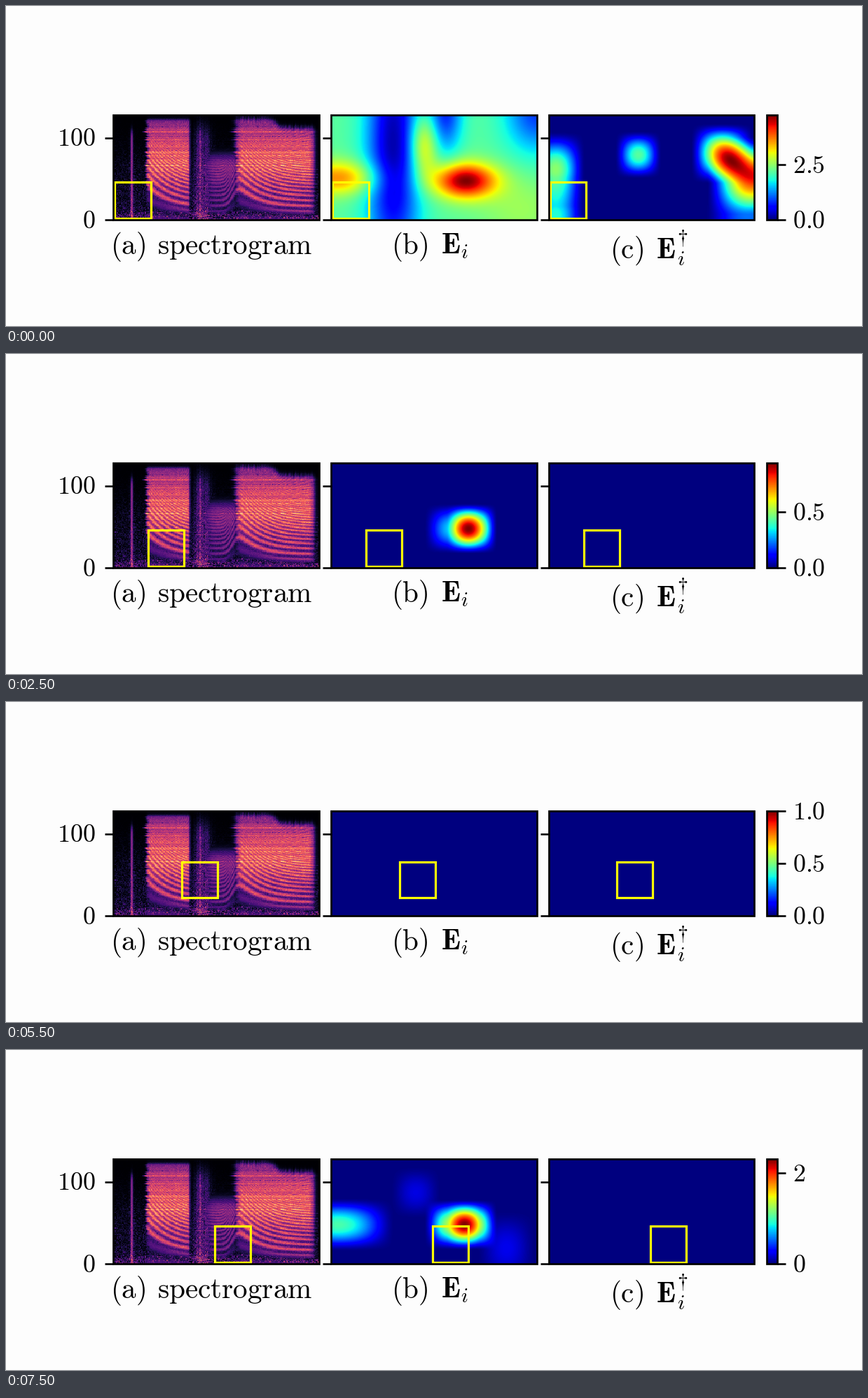
Animation, 1222 px wide and 458 px high, one loop 8000 ms. Source, as a matplotlib script:

```python
import numpy as np
import matplotlib.pyplot as plt
from matplotlib.animation import FuncAnimation
from matplotlib.patches import Rectangle

DPI = 64
W, H = 1222, 458
PT = 72 / DPI                       # points per pixel
TOP, BOTTOM = 156, 306
PANEL_X = (153, 464, 774.5)
PANEL_W = 293.5
BAR_X, BAR_W = 1086, 15
ROWS, COLS = 128, 250
STEPS, ROWS_PER_COLUMN = 16, 5
BOX = 51.2
LABEL, CAPTION, SCRIPT = 36, 41.2, 30

plt.rcParams["mathtext.fontset"] = "cm"


def pixel_grid(x0):
    x = x0 + (np.arange(COLS) + 0.5) * PANEL_W / COLS
    y = TOP + (np.arange(ROWS) + 0.5) * (BOTTOM - TOP) / ROWS
    return np.meshgrid(x, y)


GRID_A, GRID_B, GRID_C = map(pixel_grid, PANEL_X)


def rise(v, edge, width):
    return 1 / (1 + np.exp(np.clip((edge - v) / width, -50, 50)))


def fall(v, edge, width):
    return 1 - rise(v, edge, width)


def spectrogram():
    rng = np.random.default_rng(4)
    x, y = GRID_A
    h = (BOTTOM - y) / (BOTTOM - TOP) * ROWS
    grain = rng.normal(0, 1, x.shape)
    row_grain = rng.normal(0, 1, (ROWS, 1))
    column_grain = rng.normal(0, 1, (1, COLS))

    # two falling calls joined by a low, rising murmur
    lowest = 170 + 700 * np.exp(-np.clip(x - 200, 0, None) / 24)
    lowest += 600 * rise(x, 324, 4) * np.exp(-np.clip(x - 332, 0, None) / 24)
    pitch = 50 + lowest / 2
    freq = 700 * (10 ** (h * 22.2 / 2595) - 1)
    harmonic = np.cos(np.pi * freq / pitch) ** 2

    ragged = x + 1.5 * row_grain
    first = rise(ragged, 201, 1) * fall(x, 262, 0.7) * fall(h, 122, 1.5)
    second = rise(ragged, 328, 2) * fall(x, 439, 2)
    second = second * fall(h, 123 - 11 * rise(x, 386, 4) + column_grain, 2)
    murmur = 0.6 * rise(x, 284, 5) * fall(x, 328, 1) * fall(h, 78, 4)
    voiced = np.maximum(np.maximum(first, second), murmur)

    body = 0.4 + 0.27 * np.exp(-((h - 74) / 31) ** 2)
    tone = body + (0.1 + 0.28 * fall(h, 65, 10)) * (harmonic - 0.5)
    tone = tone + 0.04 * row_grain * rise(h, 50, 6) + 0.04 * grain
    tone = tone * (0.42 + 0.58 * rise(freq / lowest, 0.8, 0.06))

    noise = np.clip(0.07 + 0.07 * grain, 0, 1) * fall(h, 70, 18)
    noise = noise + np.clip(0.14 + 0.08 * grain, 0, 1) * fall(h, 8, 3)
    click = 0.4 * np.exp(-((x - 179.5) / 2) ** 2) * fall(h, 108, 3)
    breath = (0.2 + 0.05 * column_grain) * rise(x, 270, 2) * fall(x, 290, 3)
    breath = breath * fall(h, 112, 6) * (1 + 0.2 * grain)
    return np.clip(np.maximum(voiced * tone, noise + click + breath), 0, 1)


def bump(grid, cx, cy, rx, ry):
    """Separable cosine hill that reaches zero at its radii."""
    u = np.clip(np.abs(grid[0] - cx) / rx, 0, 1)
    v = np.clip(np.abs(grid[1] - cy) / ry, 0, 1)
    return np.clip(np.cos(np.pi * u / 2) * np.cos(np.pi * v / 2), 0, 1) ** 1.5


def blob(grid, cx, cy, sx, sy):
    return np.exp(-((grid[0] - cx) / sx) ** 2 - ((grid[1] - cy) / sy) ** 2)


def unit(field):
    return field / field.max()


def landscape():
    """Plain with a valley, two dips along the top, a ridge and two hot spots."""
    field = 0.46 - 0.42 * blob(GRID_B, 553, 200, 38, 190)
    field -= 0.30 * blob(GRID_B, 627, 150, 24, 60)
    field -= 0.28 * blob(GRID_B, 757, 150, 45, 60)
    field += 0.27 * blob(GRID_B, 596, 200, 20, 45)
    field += 0.08 * blob(GRID_B, 735, 290, 60, 50)
    field += 0.30 * blob(GRID_B, 475, 246, 55, 24)
    field += 0.54 * blob(GRID_B, 655, 250, 44, 25)
    return unit(np.clip(field, 0, None))


LANDSCAPE = landscape()


def field_b(limit):
    """The lower the energy, the fewer hills remain around the main one."""
    side = np.clip((limit - 0.43) / 1.3, 0, 0.85)
    left = np.clip(0.34 * (limit - 1), 0, 0.44)
    mix = np.clip((limit - 2.31) / 2.44, 0, 1)
    hills = unit(bump(GRID_B, 665, 250, 36, 36)
                 + side * bump(GRID_B, 637, 250, 40, 36))
    hills += left * bump(GRID_B, 474, 250, 80, 38)
    hills += 0.2 * left * bump(GRID_B, 585, 204, 36, 38)
    hills += 0.22 * left * bump(GRID_B, 714, 284, 42, 55)
    return unit(mix * LANDSCAPE + (1 - mix) * unit(hills))


def field_c(limit):
    spread = np.sqrt(max(limit - 0.426, 0))
    field = bump(GRID_C, 1065, 243, 46 + 4 * limit, 44 + 2.5 * limit)
    field += 0.17 * limit * bump(GRID_C, 1022, 211, 45, 43)
    field = unit(field)
    field += 0.25 * spread * bump(GRID_C, 784, 234, 42, 54)
    field += 0.19 * spread * bump(GRID_C, 784, 300, 42, 56)
    field += 0.22 * spread * bump(GRID_C, 902, 213, 33, 34)
    field += 0.05 * limit * bump(GRID_C, 1058, 300, 60, 45)
    return unit(field)


COLUMN_START = (4.75, 0.94, 0.94, 2.31)


def energy(column, row):
    """Colour limit for a box position; zero where nothing responds."""
    if column == 0 or row == 0:
        return COLUMN_START[column] * 0.787 ** row
    if column == 2 and row > 1:
        return 1.04 * 0.64 ** (row - 2)
    return 0


def tick_texts(limit):
    """At most two intervals, with as many decimals as the step needs."""
    size, digits = next((s, d) for s, d in
                        [(.25, 2), (.5, 1), (1, 0), (2, 0), (2.5, 1)]
                        if limit / s <= 2)
    return [(k * size, f"{k * size:.{digits}f}")
            for k in range(int(limit / size + 1e-9) + 1)]


fig = plt.figure(figsize=(W / DPI, H / DPI), dpi=DPI, facecolor="#fdfdfd")
ax = fig.add_axes([0, 0, 1, 1])
ax.axis("off")


def put_text(x, y, text, size, ha="left"):
    return ax.text(x, y, f"${text}$", fontsize=size * PT, color="black",
                   ha=ha, va="baseline")


def put_image(data, x, width, cmap, smooth="bilinear"):
    return ax.imshow(data, extent=(x, x + width, BOTTOM, TOP), cmap=cmap,
                     vmin=0, vmax=1, aspect="auto", interpolation=smooth)


def put_frame(x, width):
    return ax.add_patch(Rectangle((x, TOP), width, BOTTOM - TOP, fill=False,
                                  ec="black", lw=2.7 * PT, zorder=4))


def put_tick(x0, x1, y):
    return ax.plot([x0, x1], [y, y], color="black", lw=2.6 * PT,
                   solid_capstyle="butt", zorder=4)[0]


blank = np.zeros((ROWS, COLS))
put_image(spectrogram(), PANEL_X[0], PANEL_W, "magma", "nearest")
image_b = put_image(blank, PANEL_X[1], PANEL_W, "jet")
image_c = put_image(blank, PANEL_X[2], PANEL_W, "jet")
put_image(np.linspace(1, 0, 256)[:, None], BAR_X, BAR_W, "jet")

boxes = []
for px in PANEL_X:
    frame = put_frame(px, PANEL_W)
    box = ax.add_patch(Rectangle((px, TOP), BOX, BOX, fill=False, ec="#ffff00",
                                 lw=3.2 * PT, joinstyle="miter", zorder=3))
    box.set_clip_path(frame)
    boxes.append(box)
    for tick_y in (188.5, BOTTOM):
        put_tick(px - 12, px, tick_y)
put_frame(BAR_X, BAR_W)

put_text(127.5, 200.3, r"\mathrm{100}", LABEL, ha="right")
put_text(127.5, 317.8, r"\mathrm{0}", LABEL, ha="right")
put_text(149, 355, r"\mathrm{(a)}", CAPTION)
put_text(216.5, 355, r"\mathrm{spectrogram}", CAPTION)
put_text(550, 355, r"\mathrm{(b)}", CAPTION)
put_text(621, 355, r"\mathbf{E}_i", CAPTION)
put_text(862, 361, r"\mathrm{(c)}", CAPTION)
put_text(927.5, 361, r"\mathbf{E}", CAPTION)
put_text(958, 371, "i", SCRIPT)
put_text(958.5, 340, r"\dagger", SCRIPT)

bar_ticks = [put_tick(BAR_X + BAR_W, 1113, BOTTOM) for _ in range(3)]
bar_texts = [put_text(1123, BOTTOM, "0", LABEL) for _ in range(3)]
ax.set_xlim(0, W)
ax.set_ylim(H, 0)


def draw(i):
    # the box climbs one column, then jumps to the foot of the next
    column, row = divmod(i, ROWS_PER_COLUMN)
    for px, box in zip(PANEL_X, boxes):
        box.set_xy((px + 2.4 + 47.6 * column, 252.4 - 23.7 * row))

    limit = energy(column, row)
    image_b.set_data(field_b(limit) if limit else blank)
    c_active = limit and (column == 0 or row > 0)
    image_c.set_data(field_c(limit) if c_active else blank)

    limit = limit or 1
    ticks = tick_texts(limit)
    for k, (line, label) in enumerate(zip(bar_ticks, bar_texts)):
        shown = k < len(ticks)
        line.set_visible(shown)
        label.set_visible(shown)
        if shown:
            value, text = ticks[k]
            y = BOTTOM - (BOTTOM - TOP) * value / limit
            line.set_ydata([y, y])
            label.set_y(y + 11.8)
            label.set_text(rf"$\mathrm{{{text}}}$")
    return [image_b, image_c, *boxes, *bar_ticks, *bar_texts]


animation = FuncAnimation(fig, draw, frames=STEPS, interval=500,
                          repeat=True, repeat_delay=0, blit=False)
plt.show()
```
